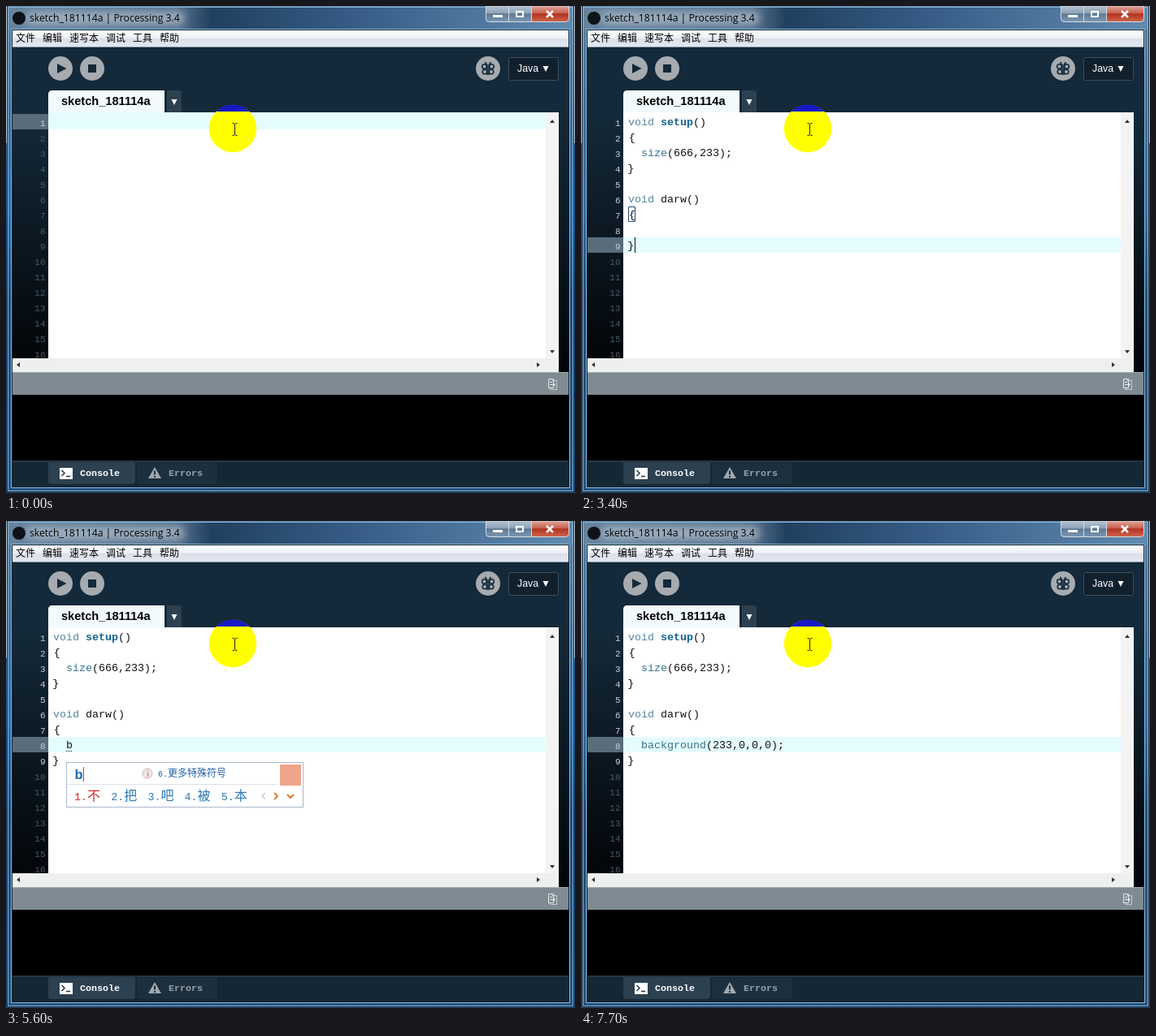
An HTML page for the animation above (8000 ms loop, 700 px wide and 600 px high).

```html
<!DOCTYPE html>
<html lang="zh">
<head>
<meta charset="utf-8">
<title>Sketch editor</title>
<style>
html, body { margin: 0; width: 100%; height: 100%; overflow: hidden; background: #15293a; }
svg { display: block; width: 700px; height: 600px; }
text { white-space: pre; }
.title { font: 12.2px "Open Sans", sans-serif; }
.cjk { font: 12px "Noto Sans CJK SC", "Noto Sans CJK", sans-serif; }
.han { font: 16px "Noto Sans CJK SC", "Noto Sans CJK", sans-serif; font-weight: 300; }
.code { font: 13.333px "Liberation Mono", monospace; }
.bold { font-weight: bold; }
.small { font-size: 10px; }
.num { font: 11px "Liberation Mono", monospace; text-anchor: end; }
.foot { font: bold 11.667px "Liberation Mono", monospace; }
.tab { font: bold 14.6px "Liberation Sans", sans-serif; }
.mode { font: 12.3px "Liberation Sans", sans-serif; fill: #fff; }
.typed { font: bold 16.5px "Liberation Sans", sans-serif; fill: #1d69b0; }
</style>
</head>
<body>
<svg viewBox="0 0 700 600" xmlns="http://www.w3.org/2000/svg">
  <defs>
    <linearGradient id="side" x2="0" y2="1">
      <stop offset="0" stop-color="#5f7f9f"/><stop offset=".25" stop-color="#3c6c9b"/>
      <stop offset=".42" stop-color="#2a70b0"/><stop offset=".6" stop-color="#1d4c7c"/>
      <stop offset="1" stop-color="#28537f"/>
    </linearGradient>
    <linearGradient id="bar">
      <stop offset="0" stop-color="#67849f"/><stop offset=".3" stop-color="#56728e"/>
      <stop offset=".36" stop-color="#20405f"/><stop offset=".6" stop-color="#355b84"/>
      <stop offset="1" stop-color="#628bb0"/>
    </linearGradient>
    <linearGradient id="menu" x2="0" y2="1">
      <stop offset="0" stop-color="#fff"/><stop offset=".45" stop-color="#eceff5"/>
      <stop offset=".5" stop-color="#dbe0eb"/><stop offset="1" stop-color="#e3e8f2"/>
    </linearGradient>
    <linearGradient id="gutter" x2="0" y2="1">
      <stop offset="0" stop-color="#142a3a"/><stop offset="1" stop-color="#020407"/>
    </linearGradient>
    <linearGradient id="red" x2="0" y2="1">
      <stop offset="0" stop-color="#e0a598"/><stop offset=".45" stop-color="#c8614f"/>
      <stop offset=".5" stop-color="#b03322"/><stop offset="1" stop-color="#d0664a"/>
    </linearGradient>
    <linearGradient id="glass" x2="0" y2="1">
      <stop offset="0" stop-color="#b4c2d0"/><stop offset=".45" stop-color="#8ea4b9"/>
      <stop offset=".5" stop-color="#5d7994"/><stop offset="1" stop-color="#7c98b3"/>
    </linearGradient>
    <filter id="soft" x="-20%" y="-80%" width="140%" height="260%"><feGaussianBlur stdDeviation="5"/></filter>
    <clipPath id="above"><path d="M0 0H700V130H0z"/></clipPath>
    <clipPath id="rows"><path d="M8 131H680V434H8z"/></clipPath>
  </defs>

  <!-- window frame -->
  <path fill="url(#side)" d="M0 0H700V600H0z"/>
  <path fill="url(#bar)" d="M2 1H698V29H2z"/>
  <rect x="24" y="7" width="196" height="16" rx="8" fill="#b0bdc9" opacity=".75" filter="url(#soft)"/>
  <path fill="#c5d3dd" d="M0 0H1V169H0zM699 0H700V169H699z"/>
  <path fill="none" stroke="#0f1f30" d="M1.500 0V598.500H698.500V0M7.500 29.500V592.500H692.500V29.500z"/>
  <path fill="none" stroke="#86b8da" d="M2.500 1.500H697.500V597.500H2.500zM6.500 28.500H693.500V593.500H6.500z"/>
  <circle cx="16" cy="15" r="8" fill="#0d1319"/>
  <text class="title" x="29" y="19">sketch_181114a | Processing 3.4</text>
  <g stroke="#d3dde6">
    <path fill="url(#glass)" d="M590.500 0H618.500V19.500H594.500Q590.500 19.500 590.500 15.500zM618.500 0H646.500V19.500H618.500z"/>
    <path fill="url(#red)" d="M646.500 0H692.500V15.500Q692.500 19.500 688.500 19.500H646.500z"/>
  </g>
  <g fill="none" stroke="#fff">
    <path stroke-width="3" d="M599 12.500H611"/>
    <path stroke-width="2" d="M628 7H636V13H628z"/>
    <path stroke-width="2.500" d="M665 6L673 14M673 6L665 14"/>
  </g>

  <path fill="url(#menu)" d="M8 30H692V51H8z"/>
  <path fill="#8c97a5" d="M8 50H692V51H8z"/>
  <g class="cjk">
    <text x="12" y="44">文件</text><text x="45" y="44">编辑</text><text x="78" y="44">速写本</text>
    <text x="123" y="44">调试</text><text x="156" y="44">工具</text><text x="189" y="44">帮助</text>
  </g>

  <!-- toolbar and tabs -->
  <path fill="#142939" d="M8 51H692V131H8z"/>
  <g fill="#a6abb0"><circle cx="67" cy="77" r="15"/><circle cx="106" cy="77" r="15"/><circle cx="593" cy="77" r="15"/></g>
  <path fill="#142939" d="M63 71L74.500 77L63 83zM101 72H111V82H101z"/>
  <g fill="none" stroke="#142939" stroke-width="1.600">
    <circle cx="588.500" cy="74.500" r="2.800"/><circle cx="597.500" cy="74.500" r="2.800"/>
    <circle cx="589" cy="81" r="2.800"/><circle cx="597" cy="81" r="2.800"/>
    <path d="M592 85V73L589.500 69M594 85V73L596.500 69"/>
  </g>
  <rect x="618.500" y="63.500" width="61" height="28" rx="2" fill="#11202d" stroke="#3b4e5d"/>
  <text class="mode" x="629" y="81">Java</text>
  <path fill="#fff" d="M660.500 74H667.500L664 81z"/>
  <path fill="#f3fafd" d="M52 131V109Q52 104 57 104H195V131z"/>
  <path fill="#2d4050" d="M198 104H212Q216 104 216 108V131H198z"/>
  <path fill="#fff" d="M203.500 115H210.500L207 122z"/>
  <text class="tab" x="68" y="122">sketch_181114a</text>

  <!-- editor -->
  <path fill="url(#gutter)" d="M8 131H692V451H8z"/>
  <path fill="#fff" d="M52 131H664V434H52z"/>
  <path fill="#f3f3f3" d="M664 131H680V434H664z"/>
  <g id="rowBg"></g>
  <g id="nums" clip-path="url(#rows)"></g>
  <path fill="#eeefef" d="M8 434H680V451H8z"/>
  <path fill="#333" d="M669 144H675L672 140zM669 424H675L672 428zM17 439V445L13 442zM653 439V445L657 442z"/>

  <!-- status, console, footer -->
  <path fill="#7e8b93" d="M8 451H692V479H8z"/>
  <path fill="#a0abb1" d="M8 451H692V452H8z"/>
  <g fill="none" stroke="#e4e9ec">
    <path d="M667.500 459.500H673.500V470.500H667.500z"/>
    <path stroke-dasharray="2 1" d="M671.500 461.500H677.500V472.500H669.500V470"/>
    <path d="M669 463.500H672M669 466.500H675M673 464L675.500 466.500L673 469"/>
  </g>
  <path d="M8 479H692V560H8z"/>
  <path fill="#142735" d="M8 560H692V592H8z"/>
  <path fill="#2b3c4a" d="M8 560H692V561.500H8z"/>
  <path fill="#2c4050" d="M52 562H159V585Q159 589 155 589H56Q52 589 52 585z"/>
  <path fill="#1c2f3e" d="M161 562H260V585Q260 589 256 589H165Q161 589 161 585z"/>
  <path fill="#fff" d="M66 569H82V583H66z"/>
  <path fill="none" stroke="#1f3342" stroke-width="1.500" d="M68.500 572L72 575.500L68.500 579M74 579.500H79"/>
  <path fill="#a0a8ae" d="M183 568L191 582H175z"/>
  <path fill="#1c2f3e" d="M182 572.500H184V577.500H182zM182 579H184V581H182z"/>
  <g class="foot"><text x="91" y="579" fill="#fff">Console</text><text x="200" y="579" fill="#98a1a8">Errors</text></g>

  <g id="code"></g>

  <!-- pointer -->
  <circle cx="279" cy="151" r="29.200" fill="#ff0"/>
  <circle id="cap" cx="279" cy="151" r="29.500" fill="#1718c6" clip-path="url(#above)"/>
  <path fill="none" stroke="#222" d="M278.500 144.500H280.500L281.500 145.500L282.500 144.500H284.500M281.500 145V159M278.500 159.500H280.500L281.500 158.500L282.500 159.500H284.500"/>
  <g id="ime"></g>
</svg>

<script>
const LOOP = 8000, ROW = 19, CH = 8;
const $ = id => document.getElementById(id);
const rowTop = n => 133 + ROW * (n - 1);
const text = (cls, x, y, str, fill = '#111') =>
  `<text class="${cls}" x="${x}" y="${y}" fill="${fill}">${str}</text>`;
const word = (row, col, str, fill, cls = 'code') =>
  text(cls, 58 + CH * col, rowTop(row) + 14, str, fill);
const box = (x, y, w, h) =>
  `<rect x="${x + .5}" y="${y + .5}" width="${w}" height="${h}" fill="#fff" stroke="#aab7cb"/>`;
const line = (d, color, width = 1) =>
  `<path d="${d}" fill="none" stroke="${color}" stroke-width="${width}"/>`;

const KEY = '#5488a0', FN = '#34738f';
const setup = word(1, 0, 'void', KEY) + word(1, 5, 'setup', '#16648f', 'code bold') + word(1, 10, '()') +
  word(2, .1, '{') + word(3, 2, 'size', FN) + word(3, 6, '(666,233);') + word(4, -.1, '}') +
  word(6, 0, 'void', KEY) + word(6, 5, 'darw()') + word(7, .1, '{') + word(9, -.1, '}');
const fillCall = word(8, 2, 'background', FN) + word(8, 12, '(233,0,0,0);');
const match = line('M58.5 247.500H66.500V265.500H58.500z', '#27466b');

// Uncommitted letters with a dotted underline
function compose(row, col, str) {
  const x = 58 + CH * col, y = rowTop(row) + 17.5;
  return word(row, col, str) +
    `<path d="M${x} ${y}H${x + CH * str.length}" stroke="#222" stroke-dasharray="1 1"/>`;
}

// Input line of the candidate window; the caret follows the letters
function entry(x, y, w, h, str, caret, logo) {
  return box(x, y, w, h) + text('typed', x + 10.5, y + 20.5, str) +
    line(`M${x + caret + .5} ${y + 6}V${y + 24}`, '#d33') +
    line(`M${x + 1} ${y + 27.5}H${x + w - 31}`, '#dde2ea') +
    `<path d="M${x + w - 28} ${y + 3}h26v26h-26z" fill="${logo}"/>`;
}

// Candidate window that offers one stored phrase
function phrase(x, y, str, caret, label, logo) {
  const dots = [103, 108, 113].map(d => `<path d="M${x + d} ${y + 40}h2v2h-2z" fill="#bf2b30"/>`).join('');
  const mid = y + 62.5;
  return entry(x, y, 220, 77, str, caret, logo) + text('code', x + 11, y + 48, label, '#bf2b30') + dots +
    line(`M${x + 16.5} ${mid - 4}l-4 4l4 4M${x + 27.5} ${mid - 4}l4 4l-4 4`, '#ccc', 1.5);
}
const setupPhrase = (str, caret) => phrase(58, 164, str, caret, 'void setup()', '#efb48f');
const fillPhrase = (str, caret) => phrase(74, 297, str, caret, 'background(', '#efa48c');

function choices(str, caret, list) {
  const items = [...list].map((c, i) => {
    const x = 84 + 45.2 * i, color = i ? '#2c79b8' : '#cf2a2a';
    return text('code', x, 344, i + 1 + '.', color) + text('han', x + 16, 344, c, color);
  }).join('');
  return entry(74, 297, 291, 55, str, caret, '#efa48c') + items +
    '<circle cx="174" cy="311" r="6" fill="#f3e6e6" stroke="#d3b9b9"/>' +
    line('M174.500 307V308.500M174.500 310V315', '#b99', 1.5) +
    text('code small', 187, 315, '6.', '#1f5fa8') + text('cjk', 199, 315, '更多特殊符号', '#1f5fa8') +
    line('M319 335l-4 4l4 4', '#ccc', 1.5) + line('M330 335l4 4l-4 4M346 337l4 4l4 -4', '#d97b32', 2);
}

// Start time, current row, last used row, code, candidate window
const scenes = [
  [0, 1, 1, '', ''],
  [600, 1, 1, compose(1, 0, 'v'), setupPhrase('v', 20)],
  [800, 1, 1, compose(1, 0, 'vo'), setupPhrase('vo', 30)],
  [1000, 1, 1, compose(1, 0, 'voi'), setupPhrase('voi', 35)],
  [1300, 1, 1, compose(1, 0, 'void'), setupPhrase('void', 45)],
  [2100, 1, 1, '', ''],
  [2300, 9, 9, setup + match, ''],
  [3700, 8, 9, setup, ''],
  [5500, 8, 9, setup + compose(8, 2, 'b'), choices('b', 21, '不把吧被本')],
  [6000, 8, 9, setup + compose(8, 2, 'ba'), choices('ba', 30, '把吧爸八⑧')],
  [6400, 8, 9, setup + compose(8, 2, 'bac'), fillPhrase('bac', 40)],
  [6700, 8, 9, setup + compose(8, 2, 'back'), fillPhrase('back', 49)],
  [7100, 8, 9, setup + fillCall, '']
];

// On, off, row, column
const carets = [
  [500, 600, 1, 0], [2200, 2300, 1, 0], [2300, 2800, 9, 1], [3300, 3700, 9, 1],
  [3700, 4200, 8, 2], [4800, 5300, 8, 2], [7100, 7600, 8, 23.8]
];

function rowBack(n) {
  const y = n === 1 ? 131 : rowTop(n), h = rowTop(n + 1) - y;
  return `<rect x="8" y="${rowTop(n)}" width="44" height="19" fill="#596c7a"/>` +
    `<rect x="52" y="${y}" width="612" height="${h}" fill="#e5fcff"/>`;
}

function numbers(last) {
  let out = '';
  for (let n = 1; n <= 16; n++)
    out += text('num', 48.5, rowTop(n) + 15, n, n <= last ? '#c6d0d7' : '#465b69');
  return out;
}

let shown = '';
function draw(t) {
  const at = scenes.findLastIndex(s => s[0] <= t);
  const caret = carets.findIndex(([on, off]) => t >= on && t < off);
  const key = at + ':' + caret;
  if (key !== shown) {
    shown = key;
    const [, row, last, code, ime] = scenes[at];
    let bar = '';
    if (caret >= 0) {
      const [, , r, col] = carets[caret], x = 58.5 + CH * col;
      bar = line(`M${x} ${rowTop(r)}V${rowTop(r + 1)}`, '#17304c', 1.2);
    }
    $('rowBg').innerHTML = rowBack(row);
    $('nums').innerHTML = numbers(last);
    $('code').innerHTML = code + bar;
    $('ime').innerHTML = ime;
  }
  $('cap').setAttribute('fill', t >= 6000 && t < 6400 ? '#2577bd' : '#1718c6');
}

function tick() {
  draw(performance.now() % LOOP);
  requestAnimationFrame(tick);
}
tick();
</script>
</body>
</html>
```
